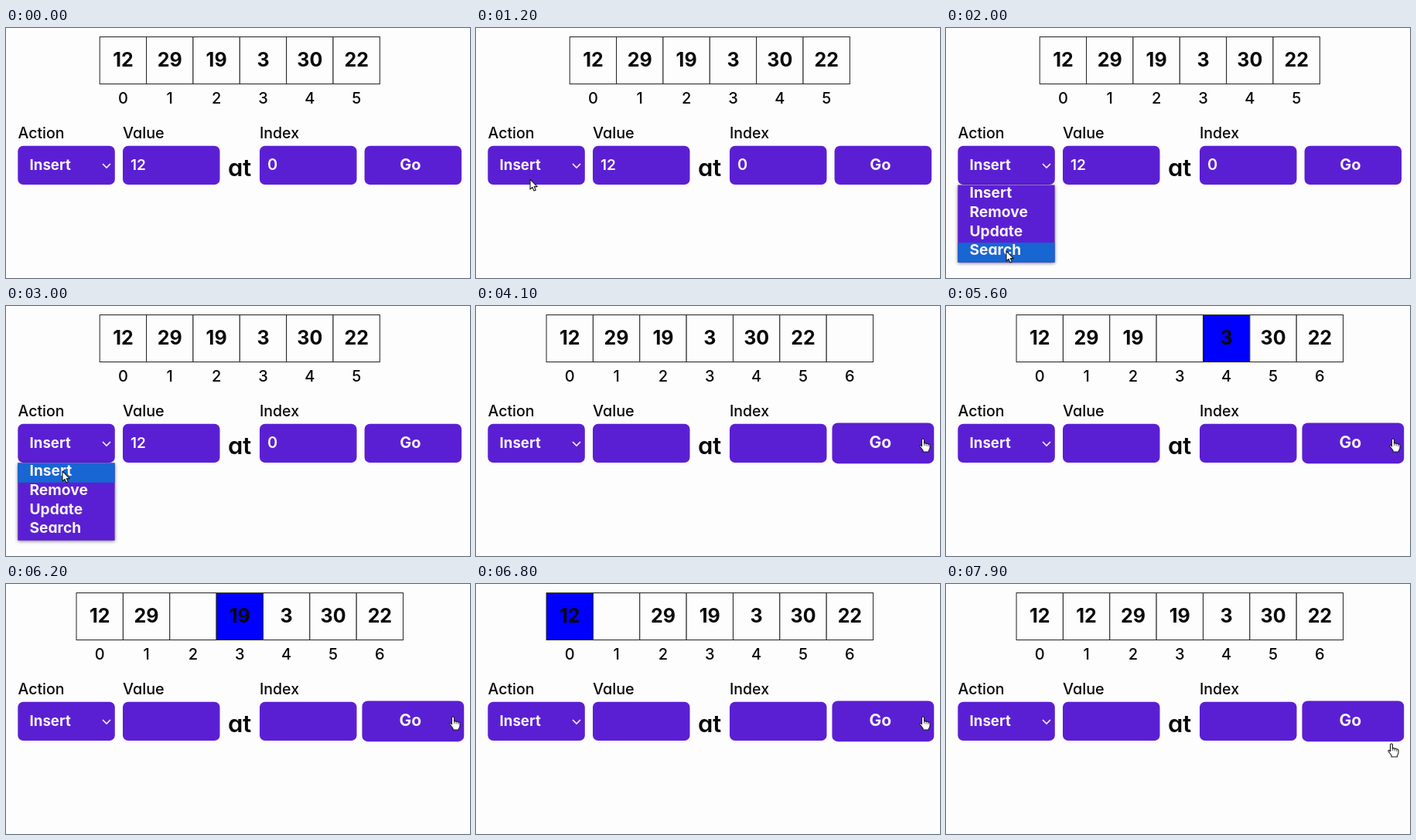
These frames come from a looping animation (600x324 px, 8000 ms). An HTML page:

```html
<!DOCTYPE html>
<html lang="en">
<head>
<meta charset="utf-8">
<title>Array insertion</title>
<style>
html, body { margin: 0; width: 100%; height: 100%; overflow: hidden; background: #fdfdfd; }
svg { display: block; width: 600px; height: 324px; }
text { font-family: Inter, "Open Sans", sans-serif; font-feature-settings: "cv11"; white-space: pre; }
</style>
</head>
<body>
<svg id="stage" viewBox="0 0 600 324"></svg>
<script>
const LOOP = 8000, TICK = 100;
const OPEN = 1400, CLOSE = 3100, CLICK = 4100, SHIFT = 4250, HALF = 250;
const PURPLE = '#5b1fd3', INK = '#080808', PALE = '#f8f4fc';
const PITCH = 60.36, ROW = 24.9, LIST_TOP = 203.5;
const start = [12, 29, 19, 3, 30, 22];
const options = ['Insert', 'Remove', 'Update', 'Search'];

// Pointer tip: time, x, y
const path = [
  [500, 3, 302], [900, 40, 250], [1300, 80, 178], [1400, 80, 178],
  [2000, 78, 289], [2300, 78, 289], [2900, 73, 214], [3100, 73, 214],
  [3500, 300, 243], [3800, 540, 190], [3900, 578, 172], [7500, 578, 172],
  [7700, 578, 192], [7900, 576, 207]
];

const stage = document.getElementById('stage');

const rect = (x, y, w, h, fill, extra = '') =>
  `<rect x="${x}" y="${y}" width="${w}" height="${h}" fill="${fill}" ${extra}/>`;
const button = (x, w = 125.5) => rect(x, 152.7, w, 50.3, PURPLE, 'rx="7"');
const text = (s, x, y, size, weight, fill = INK, anchor = 'start') =>
  `<text x="${x}" y="${y}" font-size="${size}" font-weight="${weight}" fill="${fill}" text-anchor="${anchor}">${s}</text>`;

function pointerAt(t) {
  const n = path.findIndex(p => p[0] > t);
  if (n === 0) return null;
  if (n < 0) return path[path.length - 1].slice(1);
  const a = path[n - 1], b = path[n], f = (t - a[0]) / (b[0] - a[0]);
  return [a[1] + (b[1] - a[1]) * f, a[2] + (b[2] - a[2]) * f];
}

// Cell values and the highlighted index
function arrayAt(t) {
  const cells = start.slice();
  if (t < CLICK) return { cells, lit: -1 };
  cells.push('');
  const step = Math.floor((t - SHIFT) / HALF);
  if (step < 0) return { cells, lit: -1 };
  const moves = Math.min(6, (step + 1) >> 1);
  for (let j = 0; j < moves; j++) {
    cells[6 - j] = cells[5 - j];
    cells[5 - j] = '';
  }
  if (step >= 12) cells[0] = 12;
  const lit = step < 12 ? 5 - (step >> 1) + step % 2 : step < 14 ? 0 : -1;
  return { cells, lit };
}

function drawArray(t) {
  const { cells, lit } = arrayAt(t);
  const left = 302.3 - cells.length * PITCH / 2;
  return cells.map((v, i) => {
    const x = left + i * PITCH, mid = x + PITCH / 2;
    return rect(x, 11.5, PITCH, 61, i === lit ? '#0000ff' : '#fdfdfd', 'stroke="#222" stroke-width="1"') +
      text(v, mid, 49.5, 25, 700, INK, 'middle') +
      text(i, mid, 98, 20, 500, INK, 'middle');
  }).join('');
}

function drawForm(t) {
  const full = t < CLICK;
  const grow = 1 + 0.05 * Math.max(0, Math.min(1, (t - 3700) / 200));
  return text('Action', 15.5, 143, 19.5, 500) +
    text('Value', 151, 143, 19.8, 500) +
    text('Index', 328, 143, 19.5, 500) +
    text('at', 287, 192, 31, 600) +
    button(15.3) + button(151) + button(328) +
    text('Insert', 30.5, 184, 18.7, 700, PALE) +
    '<path d="M125 176l5 5 5-5" fill="none" stroke="#f8f4fc" stroke-width="1.6"/>' +
    (full ? text('12', 161, 184, 19, 600, PALE) + text('0', 338, 184, 20, 600, PALE) : '') +
    `<g transform="translate(526.3 177.9) scale(${grow}) translate(-526.3 -177.9)">` +
    button(463.6) + text('Go', 523, 184, 20, 700, PALE, 'middle') + '</g>';
}

function drawList(y) {
  const hover = Math.max(0, Math.min(3, Math.floor((y - LIST_TOP) / ROW)));
  return rect(15.3, LIST_TOP, 125.3, 100.3, PURPLE, 'style="filter:drop-shadow(0 1px 2px #0008)"') +
    rect(15.3, LIST_TOP + hover * ROW, 125.3, 25.3, '#1766d2') +
    options.map((s, i) => text(s, 30.5, 220 + i * 24.8, 19.2, 700, PALE)).join('');
}

function drawPointer([x, y], hand) {
  const d = hand
    ? 'M-1.5 1Q0-1 1.5 1V6Q3 5 4 6.5Q6 5.5 6.7 7.3Q9 6.5 9 9V12Q8.6 14 7.4 15.5V17H0V15L-4 10Q-4.5 8-2.6 8.6L-1.5 9.8Z'
    : 'M0 0V13L3 10.4L5 15L7.3 14L5.3 9.6H9.3Z';
  const lines = hand ? '<path d="M1.7 6V9M4.2 7V9.5M6.7 8V10" stroke="#222" stroke-width=".8"/>' : '';
  return `<g transform="translate(${x} ${y})"><path d="${d}" fill="#fff" stroke="#181818" stroke-width="1.1" stroke-linejoin="round"/>${lines}</g>`;
}

let last = -1;
function draw(now) {
  const t = Math.floor(now % LOOP / TICK) * TICK;
  if (t !== last) {
    last = t;
    const tip = pointerAt(t);
    stage.innerHTML = drawArray(t) + drawForm(t) +
      (t >= OPEN && t < CLOSE ? drawList(tip[1]) : '') +
      (tip ? drawPointer(tip, t >= 3700) : '');
  }
  requestAnimationFrame(draw);
}
draw(performance.now());
</script>
</body>
</html>
```
